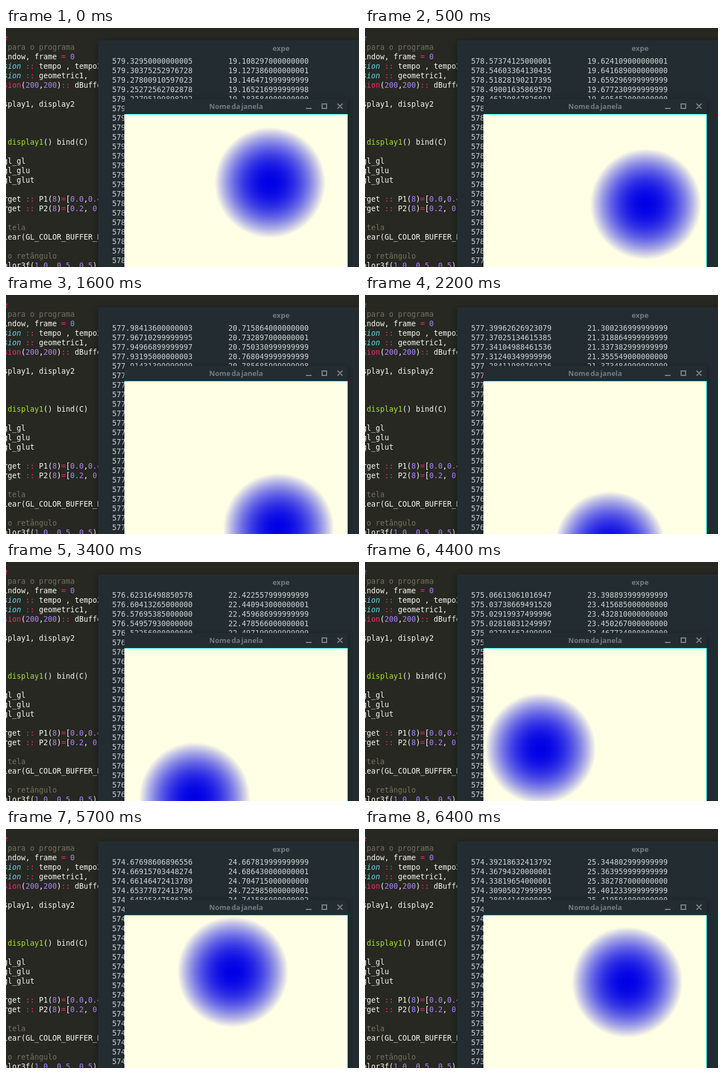
Write an HTML page with a canvas that moves like this. It is 632 by 428 pixels and loops after 6.5 s.

```html
<!DOCTYPE html>
<html lang="pt">
<head>
<meta charset="utf-8">
<title>expe</title>
<style>
html, body { margin: 0; width: 100%; height: 100%; overflow: hidden; background: #272822; }
#stage { position: relative; width: 632px; height: 428px; overflow: hidden; background: #272822; }
#stage > *, .term > *, .win > * { position: absolute; }
pre { margin: 0; font: 13.29px/17px "DejaVu Sans Mono", monospace; white-space: pre; }
.code { left: -5px; top: 9px; color: #f8f8f2; }
.k { color: #f92672; }
.n { color: #ae81ff; }
.f { color: #a6e22e; }
.t { color: #66d9ef; font-style: italic; }
.c { color: #75715e; }
.term { left: 165px; top: 22px; width: 480px; height: 420px; background: #232c31;
  border-radius: 3px 0 0 0; box-shadow: 0 3px 12px rgba(0, 0, 0, .4); }
.term pre { top: 29px; color: #cdd3d3; }
#values { left: 25px; }
#times { left: 233px; }
.title { text-align: center; color: #717b80;
  font: 600 12.9px/18px "Noto Sans", "Open Sans", sans-serif; }
.term .title { left: 88px; top: 5px; width: 479px; }
.win .title { left: 0; top: 4px; width: 400px; font-size: 12.7px; word-spacing: -1.5px; }
.win { left: 212px; top: 127px; width: 400px; height: 310px; background: #232c31;
  border-radius: 3px 3px 0 0; box-shadow: 0 2px 8px rgba(0, 0, 0, .4); }
.frame { left: 0; top: 27px; width: 399px; height: 280px; border: solid #0ff; border-width: 1px 1px 0 0; }
.buttons { left: 320px; top: 0; fill: none; stroke: #7b8488; stroke-width: 2; }
canvas { left: 0; top: 28px; width: 400px; height: 274px; image-rendering: pixelated; }
</style>
</head>
<body>
<div id="stage">
<pre class="code"><span class="k">e</span>
<span class="c"> para o programa</span>
indow, frame <span class="k">=</span> <span class="n">0</span>
<span class="t">sion</span> <span class="k">::</span> tempo , tempo2
<span class="t">sion</span> <span class="k">::</span> geometric1,
<span class="k">sion</span>(<span class="n">200</span>,<span class="n">200</span>)<span class="k">::</span> dBuffer

splay1, display2



<span class="f"> display1</span>() bind(C)

gl_gl
gl_glu
gl_glut

rget <span class="k">::</span> P1(<span class="n">8</span>)<span class="k">=</span>[<span class="n">0.0</span>,<span class="n">0.4</span>
rget <span class="k">::</span> P2(<span class="n">8</span>)<span class="k">=</span>[<span class="n">0.2</span>, <span class="n">0.4</span>

<span class="c"> tela</span>
lear(GL_COLOR_BUFFER_BIT)

<span class="c"> o retângulo</span>
olor3f(<span class="n">1.0</span>, <span class="n">0.5</span>, <span class="n">0.5</span>)</pre>
<div class="term">
  <div class="title">expe</div>
  <pre id="values"></pre>
  <pre id="times"></pre>
</div>
<div class="win">
  <div class="title">Nome da janela</div>
  <svg class="buttons" width="80" height="27">
    <path d="M5 17H15M34 9H42V17H34ZM61.5 8.5L70.5 17.5M70.5 8.5L61.5 17.5"/>
  </svg>
  <canvas id="view" width="200" height="137"></canvas>
  <div class="frame"></div>
</div>
</div>
<script>
const $ = id => document.getElementById(id);
const LOOP = 6500, STEP = 100, ROWS = 22;
const START = 19.108297, END = 26;

// Loop time in ms against program time, with one stall.
const clock = [
  [0, START], [1100, 20.238973], [2400, 21.5], [2700, 21.5], [2800, 21.837], [6400, 25.348394]
];

// Program time against the drifting value in the first column.
const drift = [
  [START, 579.3295], [19.36, 578.99], [20.28, 577.54], [20.58, 578.12],
  [21.3, 577.4], [21.56, 576.99], [22.43, 576.62], [22.83, 576.04],
  [23.42, 575.03], [23.9, 575], [25.35, 574.39], [25.85, 573.6]
];

function lookup(keys, x) {
  let i = 1;
  while (i < keys.length - 1 && keys[i][0] < x) i++;
  const [x0, y0] = keys[i - 1], [x1, y1] = keys[i];
  return y0 + (y1 - y0) * (x - x0) / (x1 - x0);
}

// Time between two log rows; it swells and shrinks slowly.
const rowGap = time => 0.018 + 0.0009 * Math.sin(2 * (time - 21.17));

const log = [];
for (let t = START; t < END; t += rowGap(t) + 0.0004 * Math.sin(log.length * 7.3)) {
  log.push(Math.round(t * 1e6) / 1e6);
}

function drawLog(time) {
  const top = log.findIndex(t => t >= time - rowGap(time) / 2);
  const rows = log.slice(top, top + ROWS);
  $('values').textContent = rows.map(t => lookup(drift, t).toFixed(14)).join('\n');
  $('times').textContent = rows.map(t => t.toFixed(15)).join('\n');
}

const ctx = $('view').getContext('2d');
const image = ctx.createImageData(200, 137);

// The ball is at the time of the newest row, below the visible ones.
function drawBall(time) {
  const angle = time + ROWS * rowGap(time + 0.2);
  const cx = 199.4 + 99.5 * Math.sin(angle);
  const cy = 200.2 - 99.5 * Math.cos(angle);
  let p = 0;
  for (let y = 0; y < image.height; y++) {
    for (let x = 0; x < image.width; x++) {
      const dist = Math.hypot(2 * x + 1 - cx, 2 * y + 1 - cy) / 99.5;
      const shade = 255 * Math.min(1, dist * dist);
      image.data.set([shade, shade, 230, 255], p);
      p += 4;
    }
  }
  ctx.putImageData(image, 0, 0);
}

let shown = -1;
function tick() {
  const step = Math.floor(performance.now() % LOOP / STEP);
  if (step !== shown) {
    shown = step;
    const time = lookup(clock, step * STEP);
    drawBall(time);
    drawLog(time);
  }
  requestAnimationFrame(tick);
}
tick();
</script>
</body>
</html>
```
